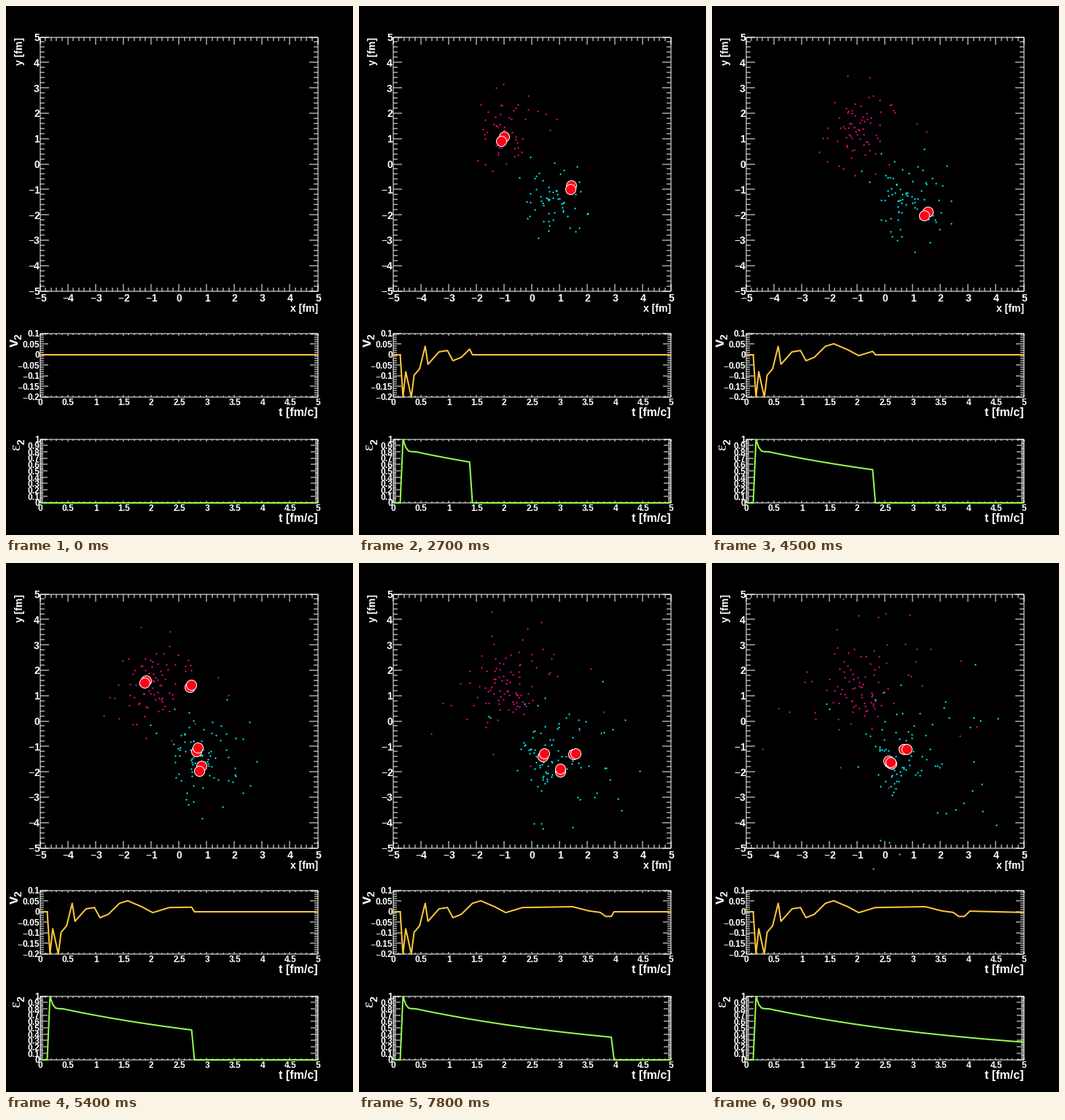
Recreate the animation shown at these times as a matplotlib script. Size 476 px wide and 725 px high, loop 10 s.

```python
import numpy as np
import matplotlib.pyplot as plt
from matplotlib.animation import FuncAnimation
from matplotlib.collections import LineCollection
from matplotlib.patches import Rectangle

W, H, DPI = 476, 725, 100
PX = 72 / DPI
FRAMES = 100
START = 3
LEFT, RIGHT = 47, 428
PINK, CYAN, RED = "#ff0a90", "#00ffff", "#ff0015"
ORANGE, GREEN = "#ffc83c", "#96ff50"
PINK_C, CYAN_C = (204, 166), (264, 267)

fig = plt.figure(figsize=(W / DPI, H / DPI), dpi=DPI, facecolor="black")
ax = fig.add_axes([0, 0, 1, 1])
ax.set(xlim=(0, W), ylim=(H, 0))
ax.axis("off")


def text(x, y, s, size, ha="left", rot=0, weight="bold", font="Liberation Sans"):
    ax.text(x, y, s, color="white", fontsize=size * PX, ha=ha, va="baseline",
            rotation=rot, rotation_mode="anchor", weight=weight, family=font)


def number(x, y, v, size, ha):
    """Bold digits with a thin minus, vertically centred on y."""
    s = f"{abs(v):g}"
    width = size * sum(0.278 if c == "." else 0.556 for c in s)
    base = y + 0.36 * size
    if v < 0:
        if ha == "center":
            x += 0.29 * size
        edge = x - (width if ha == "right" else width / 2)
        text(edge, base, "\u2212", size, "right", weight="normal")
    text(x, base, s, size, ha)


def pad(top, bottom, xr, yr, xstep, ystep, xlen, ylen, size, xlab):
    """Framed pad with ticks on all four sides, five minor steps per major one."""
    segs = [[(LEFT, top), (RIGHT, top)], [(LEFT, bottom), (RIGHT, bottom)],
            [(LEFT, top), (LEFT, bottom)], [(RIGHT, top), (RIGHT, bottom)]]
    for (lo, hi), step, lens, vertical in ((xr, xstep, xlen, False),
                                           (yr, ystep, ylen, True)):
        n = round((hi - lo) / step * 5)
        for i in range(n + 1):
            major = i % 5 == 0
            d = lens[0] if major else lens[1]
            v = round(lo + i * step / 5, 6) + 0.0
            if vertical:
                p = bottom + (top - bottom) * i / n
                segs += [[(LEFT, p), (LEFT + d, p)], [(RIGHT - d, p), (RIGHT, p)]]
                if major:
                    number(LEFT - 1, p, v, size, "right")
            else:
                p = LEFT + (RIGHT - LEFT) * i / n
                segs += [[(p, top), (p, top + d)], [(p, bottom - d), (p, bottom)]]
                if major:
                    number(p, xlab, v, size, "center")
    # Whole-pixel edges leave each line as a soft two-pixel grey
    ax.add_collection(LineCollection(np.floor(segs), colors="white",
                                     linewidths=PX, snap=False))


pad(43, 391, (-5, 5), (-5, 5), 1, 1, (10, 5), (12, 6), 14, 400)
pad(449, 536, (0, 5), (-0.2, 0.1), 0.5, 0.05, (3, 2), (11, 5), 12, 543)
pad(594, 681, (0, 5), (0, 1), 0.5, 0.1, (3, 2), (10, 4), 12, 688)

text(RIGHT, 419, "x [fm]", 14, "right")
text(23, 43, "y [fm]", 14, "right", 90)
for base in (562, 707):
    text(RIGHT, base, "t [fm/c]", 16, "right")
text(17, 467, "v", 20, rot=90)
text(22, 457, "2", 14, rot=90)
text(19, 609, "\u03b5", 21, rot=90, weight="normal", font="Liberation Serif")
text(26, 601, "2", 14, rot=90)

# Flow: a jagged start that settles near zero (thousandths at turning points)
steps = np.arange(FRAMES)
curve_x = LEFT + (RIGHT - LEFT) * (steps + 0.5) / FRAMES
turns = [(2, 0), (3, -200), (4, -80), (6, -200), (7, -97), (9, -66), (11, 40),
         (12, -45), (16, 14), (19, 20), (21, -28), (24, -12), (28, 40), (31, 52),
         (36, 24), (40, -4), (46, 20), (64, 24), (70, 4), (74, -3), (76, -22),
         (78, -22), (80, 3), (99, -3)]
flow = np.interp(steps, *zip(*turns)) / 1000

# Eccentricity: slow decay with a short ringing spike at the start
age = np.maximum(steps - START, 0)
ecc = 0.81 * np.exp((4 - age) / 87) + 0.15 * np.exp(-age / 1.2) * np.cos(age)
ecc[:START] = 0

flow_line, = ax.plot([], [], color=ORANGE, lw=2 * PX, zorder=3)
ecc_line, = ax.plot([], [], color=GREEN, lw=2 * PX, zorder=3)

rng = np.random.default_rng(12)


class Swarm:
    """Particles born around a centre that fly off in straight lines."""

    def __init__(self, color, centre, n=98):
        self.birth = START + np.floor(62 * rng.random(n) ** 2)
        self.origin = rng.normal(centre, 22, (n, 2))
        angle = rng.uniform(0, 2 * np.pi, n)
        speed = 0.15 + 1.75 * rng.random(n) ** 3
        self.vel = speed[:, None] * np.column_stack([np.cos(angle), np.sin(angle)])
        self.line, = ax.plot([], [], ls="", marker="o", ms=2.2 * PX, mew=0,
                             color=color, zorder=4)
        self.line.set_clip_path(Rectangle((0, 0), W, 435, transform=ax.transData))

    def draw(self, k):
        alive = self.birth <= k
        pos = self.origin + (k - self.birth)[:, None] * self.vel
        self.line.set_data(*pos[alive].T)


swarms = [Swarm(PINK, PINK_C), Swarm(CYAN, CYAN_C)]


def collisions(k):
    """Touching pairs; the pink side collides less and less."""
    points = []
    for _ in range(rng.integers(1, 5) if k >= START else 0):
        centre = PINK_C if rng.random() < 0.5 - k / 200 else CYAN_C
        first = rng.normal(centre, (22, 14))
        points += [first, first + rng.normal(0, 3, 2)]
    return np.reshape(points, (-1, 2))


hits = [collisions(k) for k in range(FRAMES)]
balls, = ax.plot([], [], ls="", marker="o", ms=14 * PX, mfc=RED, mec="white",
                 mew=PX, zorder=5)


def draw(k):
    flow_line.set_data(curve_x, 478 - 290 * np.where(steps <= k, flow, 0))
    ecc_line.set_data(curve_x, 681 - 87 * np.where(steps <= k, ecc, 0))
    for swarm in swarms:
        swarm.draw(k)
    balls.set_data(*hits[k].T)
    return []


anim = FuncAnimation(fig, draw, frames=FRAMES, interval=100, repeat=True, blit=False)
plt.show()
```
